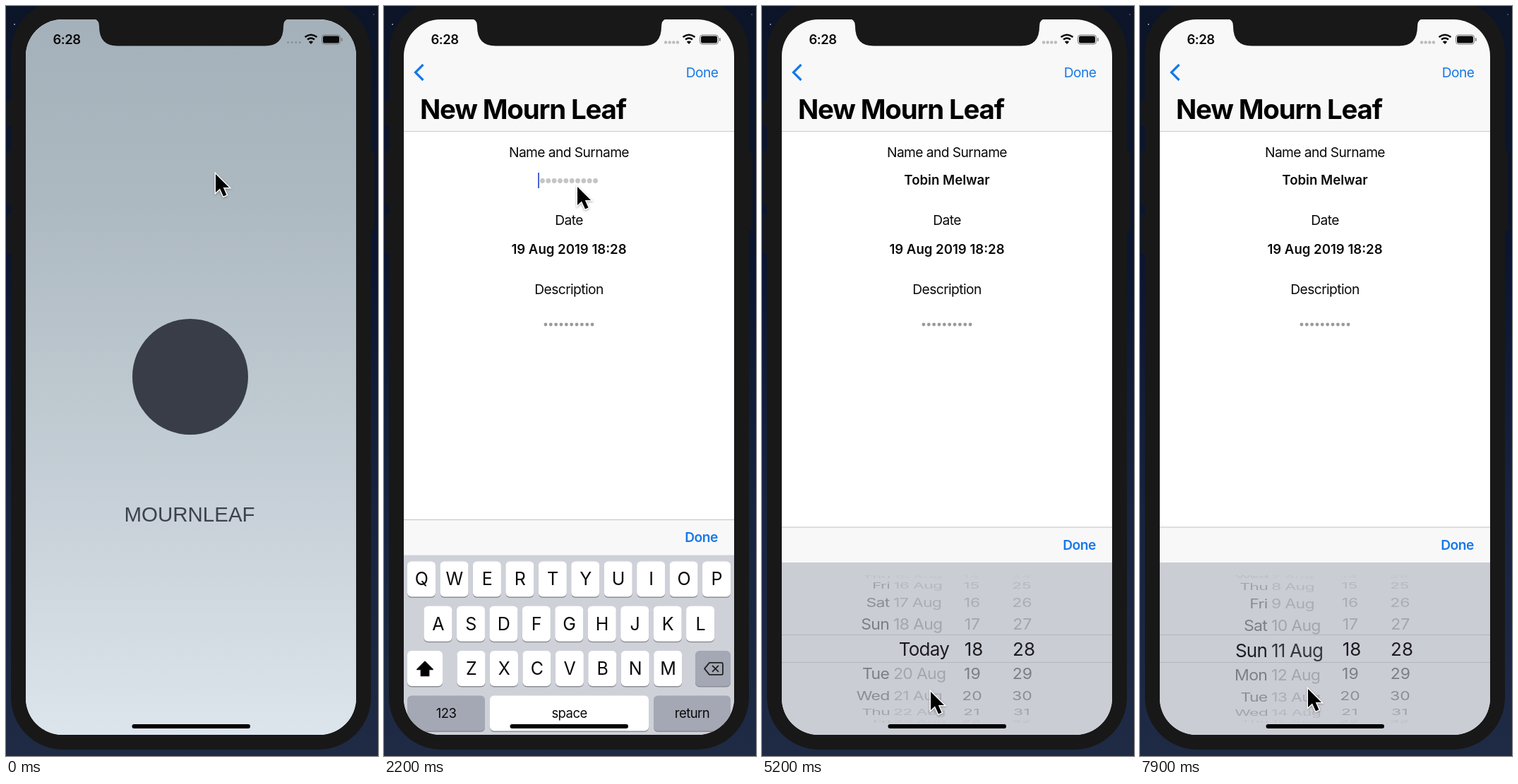
Recreate the animation shown at these times as an HTML page with a canvas. Size 527 by 1062 pixels, loop 8000 ms.

```html
<!DOCTYPE html>
<html lang="en">
<head>
<meta charset="utf-8">
<style>
  html, body { margin: 0; width: 100%; height: 100%; overflow: hidden; background: #0c1528; }
  canvas { display: block; }
</style>
</head>
<body>
<canvas id="stage" width="527" height="1062"></canvas>
<script>
const ctx = document.getElementById('stage').getContext('2d');
const LOOP = 8000, BLUE = '#1878e6', INK = '#0a0a0a';
const LEFT = 28, RIGHT = 496, TOP = 19, BOTTOM = 1032, WIDTH = RIGHT - LEFT, MID = 262, BAR = 178;
const NAME = 'Tobin Melwar';

const NOTES = [
  [178, 'Kirk Dovallin', ['I never had the passion for very long walks, and so my', 'it was better to burn the big lamp all night now']],
  [311, 'Ada Fenn', ['If you know why destiny called me, then please blame', 'Blame only the rain, the wind, the tide and the old road', 'I had previously taken alone, all in autumn.']],
  [464, 'Veddin Van Holm', ['The sadness has now passed']],
  [579, 'Merrick Tolbroe', ['Call me hazy, but I thought it all over and I wrote.', 'I listed my concerns on a single small page.', 'The sea loves me. The town never did, and so I have', 'hurried past her.']],
  [751, 'Dorian Sellams', ['I can live with that. You may keep the hat and coat.']],
  [867, 'Ivo Lunt', ['So long.']],
  [982, 'Nell Oba', []]
];

// Keyframes: [time, x, y]
const POINTER = [[0, 296, 236], [250, 296, 236], [650, 455, 94], [800, 455, 94], [1000, 299, 187],
  [1400, 273, 254], [4000, 273, 254], [4300, 275, 345], [4550, 275, 345], [5050, 238, 969],
  [5400, 238, 969], [6000, 228, 1030], [6700, 223, 1053], [6850, 223, 1053], [7400, 238, 900], [7850, 237, 965]];
// Keyframes: [time, days from today]
const WHEEL = [[5400, 0], [5900, -8], [6800, -21.78], [6950, -21.9], [7600, -9], [7850, -8.06]];

const clamp = v => Math.max(0, Math.min(1, v));
const easeOut = (t, start, length) => 1 - (1 - clamp((t - start) / length)) ** 3;
const mix = (a, b, p) => a + (b - a) * p;

function track(keys, t) {
  const next = keys.findIndex(k => k[0] > t);
  if (next < 0) return keys.at(-1).slice(1);
  if (next === 0) return keys[0].slice(1);
  const a = keys[next - 1], b = keys[next];
  const u = (t - a[0]) / (b[0] - a[0]), p = u * u * (3 - 2 * u);
  return a.slice(1).map((v, i) => mix(v, b[i + 1], p));
}

function text(str, x, y, size, { weight = 400, color = INK, align = 'center', family = 'Inter', track = -0.03 } = {}) {
  ctx.font = `${weight} ${size}px "${family}", sans-serif`;
  ctx.letterSpacing = `${size * track}px`;
  ctx.textAlign = align;
  ctx.fillStyle = color;
  ctx.fillText(str, x, y + size * 0.364);
}
function rect(x, y, w, h, color, radius = 0) {
  ctx.fillStyle = color;
  ctx.beginPath();
  ctx.roundRect(x, y, w, h, radius);
  ctx.fill();
}
function dots(count, x, y, step, r, color) {
  ctx.fillStyle = color;
  for (let i = 0; i < count; i++) {
    ctx.beginPath();
    ctx.arc(x + (i - (count - 1) / 2) * step, y, r, 0, 7);
    ctx.fill();
  }
}
function stroke(d, color, width) {
  ctx.strokeStyle = color;
  ctx.lineWidth = width;
  ctx.stroke(new Path2D(d));
}
function gradient(y0, y1, ...stops) {
  const g = ctx.createLinearGradient(0, y0, 0, y1);
  stops.forEach((c, i) => g.addColorStop(i / (stops.length - 1), c));
  return g;
}
function group(draw, { x = 0, y = 0, alpha = 1, sy = 1 } = {}) {
  if (alpha <= 0) return;
  ctx.save();
  ctx.translate(x, y);
  ctx.scale(1, sy);
  ctx.globalAlpha *= alpha;
  draw();
  ctx.restore();
}

function drawDesktop() {
  rect(0, 0, 527, 1062, gradient(0, 1062, '#0c1528', '#0b1530', '#17233f', '#1f2b45'));
  dots(1, 12, 26, 0, 1, '#aab');
  dots(1, 521, 12, 0, 1, '#556');
  for (const [x, y, h] of [[1, 133, 37], [1, 205, 77], [1, 295, 56], [515, 205, 113]]) rect(x, y, 7, h, '#17181b', 2);
  rect(7, -8, 510, 1061, '#181818', 74);
}

function drawStatus(splash) {
  text('6:28', 86, 47.5, 18.5, { weight: 600 });
  if (splash > 0.5) dots(4, 408, 51.5, 5.6, 1.5, '#85919a');
  else dots(4, 407.5, 51.5, 5.6, 2.2, '#bcbcbe');
  ctx.fillStyle = INK;
  ctx.beginPath();
  ctx.moveTo(432, 54);
  ctx.arc(432, 54, 4.5, -2.36, -0.78);
  ctx.fill();
  stroke('M427 47.5Q432 43.5 437 47.5M423.5 44Q432 37.5 440.5 44', INK, 2.6);
  ctx.strokeStyle = '#777';
  ctx.lineWidth = 1;
  ctx.beginPath();
  ctx.roundRect(447.5, 41, 26, 13, 3.5);
  ctx.stroke();
  rect(449, 42.5, 23, 10, INK, 2);
  rect(475, 45, 1.6, 5, '#777', 1);
}

function drawSplash() {
  rect(LEFT, TOP, WIDTH, 1013, gradient(TOP, BOTTOM, '#a5b1ba', '#adb9c1', '#bcc7ce', '#ccd4dc', '#dce4ec'));
  dots(1, 261, 525, 0, 82, '#383d47');
  text('MOURNLEAF', 260, 719, 29.5, { family: 'Liberation Sans', color: '#3d424b', track: 0 });
}

function drawList(push) {
  group(() => {
    rect(LEFT, BAR, WIDTH * 1.3, 854, '#fff');
    for (const [y, name, lines] of NOTES) {
      if (y > BAR) rect(LEFT, y, WIDTH, 1, '#c8c8c8');
      text(name, 51, y + 38, 19.2, { weight: 600, align: 'left', track: -0.01 });
      lines.forEach((line, i) => text(line, MID, y + 69.5 + i * 19, 15.8, { color: '#2a2a2a' }));
    }
  }, { x: -0.3 * WIDTH * push });
  rect(LEFT, BAR, WIDTH, 854, `rgba(10,25,20,${0.115 * push})`);
}

function drawForm(shift, typed, caret) {
  const value = { weight: 600, track: 0 };
  group(() => {
    rect(LEFT, BAR, WIDTH, 854, '#fff');
    text('Name and Surname', MID, 207, 19.2);
    text('Date', MID, 303.5, 19.2);
    text('19 Aug 2019 18:28', MID, 344.5, 18.6, value);
    text('Description', MID, 401.5, 19.2);
    dots(10, MID, 451, 7.35, 2.4, '#9a9a9c');
    let caretX = 218;
    if (typed) {
      const str = NAME.slice(0, typed);
      text(str, MID, 246.5, 18.6, value);
      caretX = MID + ctx.measureText(str).width / 2;
    } else dots(10, MID, 247.5, 8.35, 3.4, '#c5c5c7');
    if (caret) rect(caretX, 236, 2, 22, '#4a62d6');
  }, { x: shift });
}

function drawNav(push, shift) {
  rect(LEFT, TOP, WIDTH, BAR - TOP, '#f8f8f8');
  rect(LEFT, BAR - 1, WIDTH, 1, '#cacaca');
  const title = { weight: 700, align: 'left', color: '#000' };
  group(() => {
    text('Mourn Leaves', 51 - WIDTH * push * 0.3, 146, 38.4, title);
    stroke('M453 94H471M462 85V103', BLUE, 2.2);
  }, { alpha: 1 - push * 1.6 });
  if (push > 0) text('New Mourn Leaf', 51 + shift * 1.17, 146, 38.4, title);
  group(() => text('Done', 450.5, 94, 19.2, { color: BLUE }), { alpha: push });
  group(() => stroke('M55.5 83L44.5 94L55.5 105', BLUE, 3.2), { alpha: (push - 0.85) / 0.15 });
}

function drawAccessory() {
  rect(LEFT, 0, WIDTH, 50, '#f8f8f9');
  rect(LEFT, -0.5, WIDTH, 1, '#c2c2c5');
  text('Done', 449.5, 25, 19.2, { weight: 600, color: BLUE });
}

function key(x, y, w, label, size, dark) {
  rect(x, y + 1.5, w, 50, '#8b8e95', 6);
  rect(x, y, w, 50, dark ? '#a4a8b4' : '#fff', 6);
  text(label, x + w / 2, y + 25 + (size > 26 ? -1 : 0), size);
}

function drawKeyboard(caps) {
  rect(LEFT, 50, WIDTH, 400, '#cfd1d9');
  const rows = [[33, 'qwertyuiop'], [56.5, 'asdfghjkl'], [103.5, 'zxcvbnm']];
  rows.forEach(([x, letters], r) => [...letters].forEach((ch, i) =>
    key(x + i * 46.45, 59 + r * 63.3, 40, caps ? ch.toUpperCase() : ch, caps ? 25 : 27.5)));
  key(33, 185.5, 50, '', 20, !caps);
  key(441, 185.5, 50, '', 20, true);
  key(33, 249, 110, '123', 18.5, true);
  key(150, 249, 225, 'space', 18.5);
  key(382, 249, 109, 'return', 18.5, true);

  const arrow = 'M58 201L69 212H63.5V221H52.5V212H47Z';
  ctx.lineJoin = 'round';
  if (caps) { ctx.fillStyle = '#000'; ctx.fill(new Path2D(arrow)); }
  stroke(arrow, '#111', 1.8);
  stroke('M454 211L461 202.5H478Q480 202.5 480 205V217Q480 219.5 478 219.5H461ZM465 206.5L474 215.5M474 206.5L465 215.5', '#222', 1.8);

  // Smiley and microphone
  stroke('M86 345A14 14 0 1 1 58 345A14 14 0 1 1 86 345ZM63 347H81Q80 355 72 355Q64 355 63 347Z', '#555a63', 1.8);
  dots(2, 72, 340, 10, 2, '#555a63');
  stroke('M454 338a4 4 0 0 1 8 0V347a4 4 0 0 1 -8 0ZM450 345V348Q450 355 458 355Q466 355 466 348V345M458 355V360M453 360H463', '#555a63', 1.8);
}

function drawWheel(position, item) {
  const base = Math.round(position), step = 0.34;
  for (let k = base - 4; k <= base + 4; k++) {
    const angle = (k - position) * step, depth = Math.cos(angle);
    if (depth < 0.05) continue;
    const chosen = k === base;
    group(() => item(k, chosen ? 26 : 23, chosen ? 0 : 2.5 * (1 - depth)),
      { y: 172.5 + 105 * Math.sin(angle), sy: depth, alpha: chosen ? 1 : 0.5 * depth - 0.03 });
  }
}

function drawPicker(days) {
  rect(LEFT, 50, WIDTH, 400, '#cbcdd5');
  rect(LEFT, 152, WIDTH, 1, '#b4b6be');
  rect(LEFT, 191, WIDTH, 1, '#b4b6be');
  const style = align => ({ align, color: '#1c1c20' });
  drawWheel(days, (k, size, inset) => {
    if (k === 0) return text('Today', 265 - inset, 0, size, style('right'));
    const [day, month, date] = new Date(2019, 7, 19 + k).toDateString().split(' ');
    text(day, 180 + inset, 0, size, style('right'));
    group(() => text(`${+date} ${month}`, 186, 0, size, style('left')), { alpha: size > 23 ? 0.85 : 0.5 });
  });
  for (const [x, value] of [[300, 18], [371, 28]])
    drawWheel(0, (k, size, inset) =>
      group(() => text(value + k, x - (k ? 2 : 0) - inset, 0, size, { ...style('center'), track: 0 }),
        { alpha: k < 0 ? 0.5 : 1 }));
}

function drawPointer(x, y) {
  group(() => {
    const arrow = new Path2D('M1 2V28L7 22.5L12 33.5L16.5 31.5L11.8 21H20Z');
    ctx.shadowColor = 'rgba(0,0,0,.35)';
    ctx.shadowBlur = 3;
    ctx.shadowOffsetY = 1;
    ctx.lineJoin = 'miter';
    ctx.strokeStyle = '#fff';
    ctx.lineWidth = 3;
    ctx.stroke(arrow);
    ctx.shadowColor = 'transparent';
    ctx.fillStyle = '#000';
    ctx.fill(arrow);
  }, { x, y });
}

function draw(t) {
  const splash = 1 - clamp((t - 250) / 200);
  const push = easeOut(t, 800, 443), shift = WIDTH * (1 - push);
  const typed = Math.max(0, Math.min(NAME.length, Math.floor((t - 2370) / 130)));
  const swap = easeOut(t, 4450, 350);
  const panelY = mix(mix(BOTTOM, 642, easeOut(t, 2025, 443)), 738, swap);

  drawDesktop();
  ctx.save();
  ctx.beginPath();
  ctx.roundRect(LEFT, TOP, WIDTH, BOTTOM - TOP, 52);
  ctx.clip();
  if (push < 1) drawList(push);
  if (push > 0) drawForm(shift, typed, t > 2000 && t < 4450);
  drawNav(push, shift);
  if (t > 2025) group(() => {
    drawAccessory();
    if (swap < 1) drawKeyboard(typed === 0);
    group(() => drawPicker(track(WHEEL, t)[0]), { alpha: swap });
  }, { y: panelY });
  group(drawSplash, { alpha: splash });
  drawStatus(splash);
  rect(178.5, 1017, 167.5, 6, '#000', 3);
  ctx.fillStyle = '#181818';
  ctx.fill(new Path2D('M122 18Q132 18 132 29Q132 56.5 158 56.5H367Q393 56.5 393 29Q393 18 403 18Z'));
  ctx.restore();
  drawPointer(...track(POINTER, t));
}

function tick() {
  draw(performance.now() % LOOP);
  requestAnimationFrame(tick);
}
tick();
</script>
</body>
</html>
```
